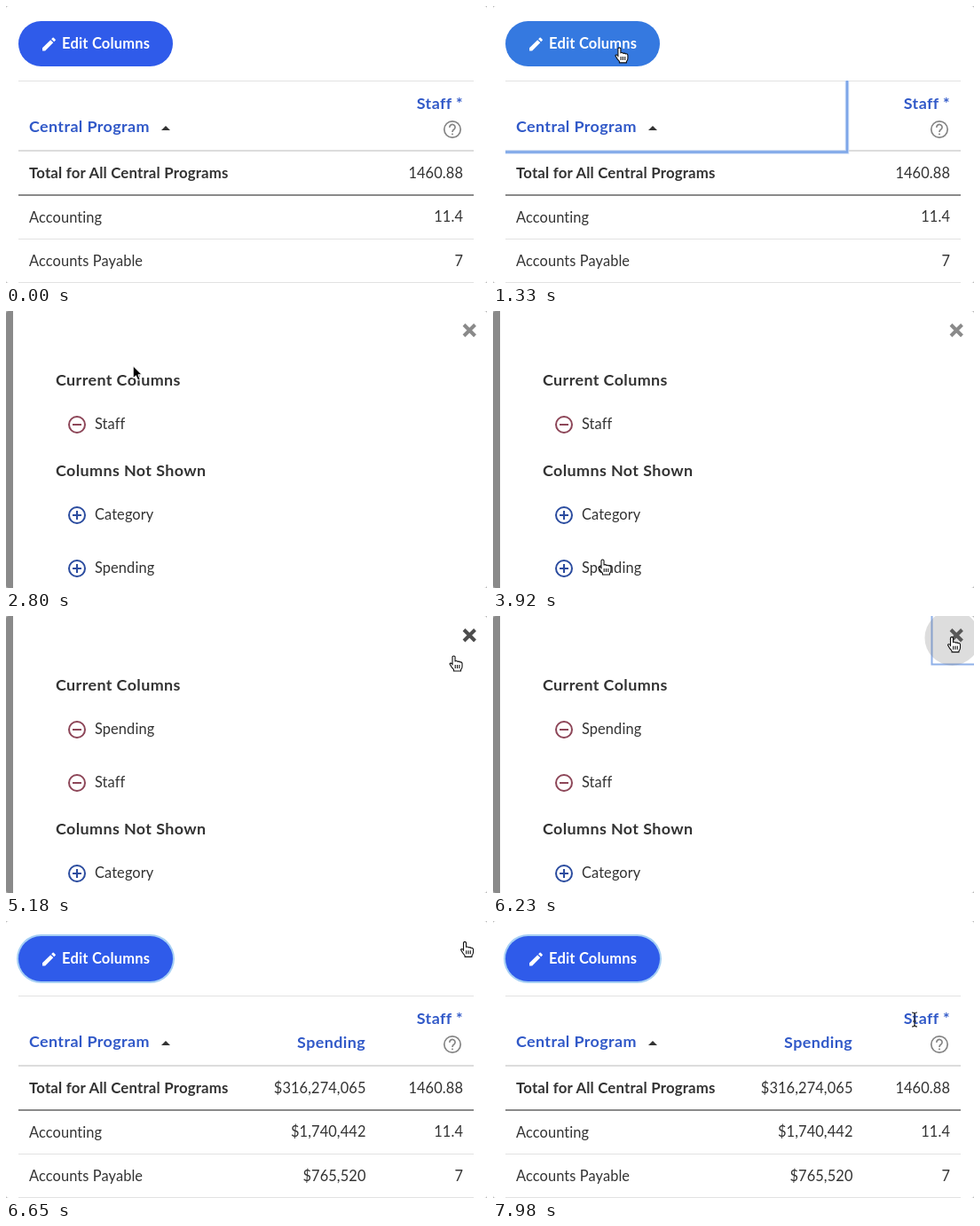
These frames come from a looping animation (542x312 px, 8 s). An HTML page:

```html
<!DOCTYPE html>
<html lang="en">
<head>
<meta charset="utf-8">
<title>Edit columns</title>
<style>
  html, body { margin: 0; width: 100%; height: 100%; overflow: hidden; background: #b4b4b4; }
  svg { display: block; width: 542px; height: 312px; }
  text { font: 400 16.4px Lato, "Open Sans", sans-serif; letter-spacing: .1px; fill: #333; }
  .strong { font-weight: 700; font-size: 16.8px; letter-spacing: .2px; }
  .title { font-weight: 700; font-size: 17.9px; letter-spacing: .4px; }
  .link { fill: #3159c8; }
  .label { font-size: 16.5px; fill: #fff; }
  .end { text-anchor: end; }
</style>
</head>
<body>
<svg id="stage" viewBox="0 0 542 312"></svg>
<script>
const LOOP = 8000;
const OPEN = [1765, 2250], CLOSE = [6270, 6650], SLIDE = 50;
const SWAP = 4130, FOCUS_CLOSE = 6230;
const CLICKS = [1610, 3780, 6230], CLICK_LENGTH = 140;

// time, x, y
const PATH = [
  [0, 300, 330], [70, 300, 318], [840, 215, 160], [1190, 143, 48],
  [2730, 142, 47], [3080, 148, 120], [3570, 122, 280], [3640, 124, 281],
  [4650, 124, 281], [4900, 330, 150], [5180, 505, 46], [5460, 515, 28],
  [5740, 517.5, 25], [7180, 517.5, 24], [7490, 482, 118], [7600, 482, 118], [7980, 475, 111]
];
// time from which each pointer shape is used
const SHAPES = [
  [0, 'arrow'], [1050, 'hand'], [2200, 'arrow'], [3640, 'hand'], [4760, 'arrow'],
  [5110, 'hand'], [7070, 'arrow'], [7420, 'beam']
];

const text = (x, y, s, cls = '') => `<text x="${x}" y="${y}" class="${cls}">${s}</text>`;
const rule = (y, h, color) => `<rect x="14" y="${y}" width="513" height="${h}" fill="${color}"/>`;

function item(y, name, shown) {
  const color = shown ? '#8d4658' : '#2b4c9f';
  const sign = shown ? 'M75 0H85' : 'M75 0H85M80 -5V5';
  return `<g transform="translate(0 ${y + 1})" fill="none" stroke="${color}" stroke-width="2">
    <circle cx="80" r="9"/><path d="${sign}"/></g>` + text(100, y + 5.5, name);
}

function columnList(shown, hidden) {
  const gap = 60, split = 120 + gap * shown.length;
  return text(56, 84, 'Current Columns', 'title')
    + shown.map((name, i) => item(127 + gap * i, name, true)).join('')
    + text(56, split + 6, 'Columns Not Shown', 'title')
    + hidden.map((name, i) => item(split + 49 + gap * i, name, false)).join('');
}

const table = `
  <rect width="542" height="312" fill="#fff"/>
  <rect id="ring" x="12" y="15" width="178" height="55" rx="27.5" fill="#a6cff4"/>
  <rect id="button" x="14" y="17" width="174" height="51" rx="25.5"/>
  <path transform="translate(38.5 33) scale(.83)" fill="#fff"
    d="M3 17.2V21h3.8L17.8 9.9l-3.7-3.7zM20.7 7a1 1 0 0 0 0-1.4l-2.3-2.3a1 1 0 0 0-1.4 0l-1.8 1.8 3.7 3.7z"/>
  ${text(63, 47.5, 'Edit Columns', 'strong label')}
  ${rule(84, 1, '#e2e2e2')}${rule(162, 2, '#dcdcdc')}${rule(212, 2, '#8a8a8a')}
  ${rule(262, 1, '#e2e2e2')}${rule(311, 1, '#e2e2e2')}
  <g id="outline" fill="none">
    <path d="M399 84V164.5H14" stroke="#c9dbf7" stroke-width="4.5"/>
    <path d="M399 84V164.5H14" stroke="#7ea6e8" stroke-width="2.5"/>
  </g>
  ${text(26, 142, 'Central Program', 'title link')}
  <path d="M175 140H185L180 135Z" fill="#333"/>
  ${text(515, 116, 'Staff *', 'title link end')}
  <circle cx="503" cy="139" r="9.2" fill="none" stroke="#858585" stroke-width="1.7"/>
  <path d="M499.9 136.8A3.1 3.1 0 1 1 504.8 139Q503 140.1 503 142M503 143.4V145.2"
    fill="none" stroke="#858585" stroke-width="1.7"/>
  ${text(26, 193.5, 'Total for All Central Programs', 'strong')}
  ${text(26, 243.5, 'Accounting')}${text(26, 292.5, 'Accounts Payable')}
  ${['1460.88', '11.4', '7'].map((s, i) => text(515, 193.5 + 49.5 * i, s, 'end')).join('')}
  <g id="spending">
    ${text(405, 143, 'Spending', 'title link end')}
    ${['$316,274,065', '$1,740,442', '$765,520'].map((s, i) => text(405.5, 193.5 + 49.5 * i, s, 'end')).join('')}
  </g>`;

const dialog = `
  <rect id="backdrop" width="542" height="312"/>
  <g id="panel">
    <rect x="8" width="540" height="400" fill="#fff"/>
    <g id="before">${columnList(['Staff'], ['Category', 'Spending', 'Budget'])}</g>
    <g id="after">${columnList(['Spending', 'Staff'], ['Category', 'Budget'])}</g>
    <path id="closeFocus" d="M494.5 0V54.5H542" fill="none" stroke="#8fb0e8" stroke-width="2"/>
    <path id="cross" d="M516 15.5L528.5 28M528.5 15.5L516 28" stroke-width="4"/>
  </g>`;

const pointer = `
  <circle id="click" r="31" fill="#777" fill-opacity=".25"/>
  <g id="cursor">
    <path id="arrow" d="M0 0V14L3.2 11L5.5 16.3L8 15.2L5.7 10H10Z" fill="#000" stroke="#fff"/>
    <g id="hand" stroke="#111" stroke-width="1.1" stroke-linejoin="round">
      <path fill="#fff" d="M-2 9V0Q-.5 -2 1 0V5Q2.5 4 4 5.5Q5.5 4.7 6.5 6Q8.5 5.5 9 7.5V11
        Q9 13 7.5 14.5V16H-.5V14.5Q-3 12 -5 8Q-4.5 6.3 -2 8Z"/>
      <path d="M1.2 9V13M3.5 9V13M5.8 9V13"/>
    </g>
    <path id="beam" d="M-3 -8Q0 -8 0 -6Q0 -8 3 -8M0 -6V6M-3 8Q0 8 0 6Q0 8 3 8M-2 2H2" fill="none" stroke="#222" stroke-width="1.2"/>
  </g>`;

const stage = document.getElementById('stage');
stage.innerHTML = `<clipPath id="corners"><rect width="542" height="312" rx="3"/></clipPath>
  <g clip-path="url(#corners)">${table}${dialog}${pointer}</g>`;

const el = Object.fromEntries([...stage.querySelectorAll('[id]')].map(node => [node.id, node]));
const set = (id, name, value) => el[id].setAttribute(name, value);
const show = (id, on) => set(id, 'visibility', on ? 'visible' : 'hidden');
const progress = (t, [from, to]) => Math.min(1, Math.max(0, (t - from) / (to - from)));
const smooth = p => p * p * (3 - 2 * p);
const mix = (a, b, p) => a + (b - a) * p;

function pointerAt(t) {
  const next = PATH.findIndex(key => key[0] > t);
  if (next < 0) return PATH[PATH.length - 1].slice(1);
  const a = PATH[next - 1], b = PATH[next];
  const p = progress(t, [a[0], b[0]]);
  return [mix(a[1], b[1], p), mix(a[2], b[2], p)];
}

function render(t) {
  const open = smooth(progress(t, OPEN)) - progress(t, CLOSE);
  set('backdrop', 'opacity', 0.46 * open);
  set('panel', 'opacity', open);
  set('panel', 'transform', `translate(0 ${-SLIDE * (1 - open)})`);

  const swapped = t >= SWAP;
  el.before.style.display = swapped ? 'none' : '';
  el.after.style.display = swapped ? '' : 'none';
  show('spending', swapped);
  show('closeFocus', t >= FOCUS_CLOSE);
  set('cross', 'stroke', t >= 5110 ? '#4d4d4d' : '#8a8a8a');

  const hover = t < 3000 ? progress(t, [1050, 1330]) : 0;
  const [r, g, b] = [[47, 53], [91, 121], [234, 224]].map(([from, to]) => Math.round(mix(from, to, hover)));
  set('button', 'fill', `rgb(${r},${g},${b})`);
  show('outline', t >= 910 && t < CLICKS[0]);
  show('ring', (t >= CLICKS[0] && t < OPEN[1]) || t >= CLOSE[1]);

  const at = `translate(${pointerAt(t).join(' ')})`;
  set('cursor', 'transform', at);
  set('click', 'transform', at);
  show('click', CLICKS.some(start => t >= start && t < start + CLICK_LENGTH));
  const shape = SHAPES.filter(([start]) => t >= start).pop()[1];
  ['arrow', 'hand', 'beam'].forEach(id => show(id, id === shape));
}

const start = performance.now();
function tick() {
  render((performance.now() - start) % LOOP);
  requestAnimationFrame(tick);
}
tick();
</script>
</body>
</html>
```
